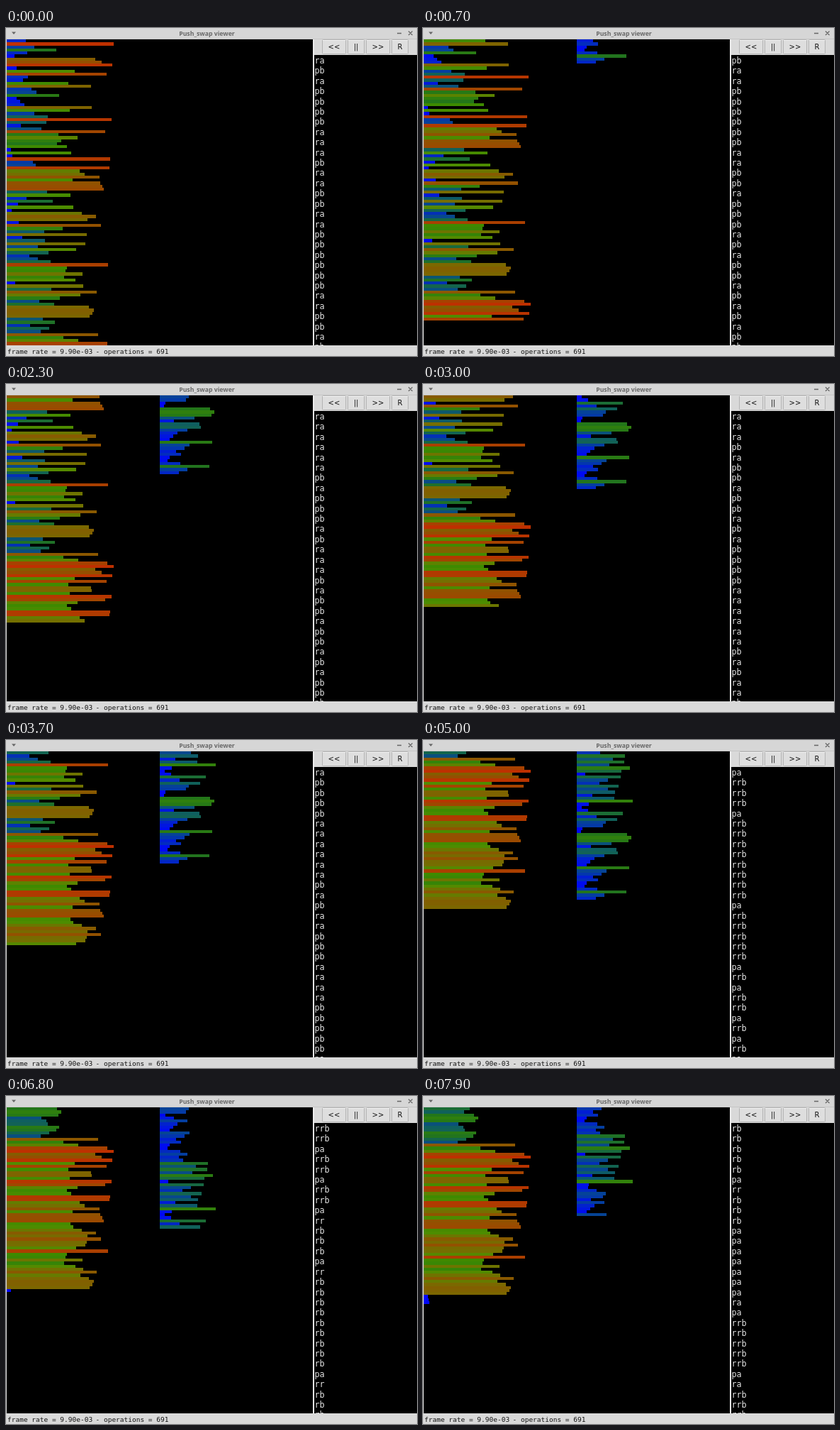
These frames come from a looping animation (580 by 462 pixels, 8000 ms). An HTML page with a canvas:

```html
<!DOCTYPE html>
<html lang="en">
<head>
<meta charset="utf-8">
<title>Push_swap viewer</title>
<style>
  html, body { margin: 0; width: 100%; height: 100%; overflow: hidden; background: #d9d9d9; }
  #stage { position: relative; width: 580px; height: 462px; overflow: hidden; background: #d9d9d9; }
  #stage > * { position: absolute; }
  svg { left: 0; top: 0; }
  #bars { left: 1px; top: 16px; background: #000; }
  #ops {
    left: 435px; top: 38px; width: 145px; height: 409px; overflow: hidden;
    margin: 0; padding: 1px 0 0 0.5px; box-sizing: border-box;
    background: #000; color: #e6e6e6;
    font: 11.7px/14.4px "DejaVu Sans Mono", monospace;
  }
</style>
</head>
<body>
<div id="stage">
  <svg width="580" height="462">
    <rect width="580" height="15" fill="#d6d6d6"/>
    <path d="M0 15.5H580" stroke="#c6c6c6"/>
    <path d="M8 5.5h6l-3 3.5z" fill="#666"/>
    <path d="M552 7.5h6M568 4.500l5.500 5.500m0-5.500l-5.500 5.500" stroke="#666" stroke-width="1.3" fill="none"/>
    <text x="283.500" y="10.500" text-anchor="middle" fill="#686868"
      font-family="Noto Sans, sans-serif" font-weight="700" font-size="8.700">Push_swap viewer</text>
    <rect x="433" y="16" width="2" height="431" fill="#ececec"/>
    <g id="buttons" text-anchor="middle" font-family="DejaVu Sans, sans-serif" font-size="10"></g>
    <g font-family="DejaVu Sans Mono, monospace" font-size="9.500" fill="#111">
      <text x="2" y="458.500">frame rate = 9.90e-03</text>
      <text x="126.500" y="458.500">- operations = 691</text>
    </g>
  </svg>
  <canvas id="bars" width="432" height="431"></canvas>
  <pre id="ops"></pre>
</div>
<script>
const LOOP = 8000, STEP = 100;
const PITCH = 4.263, B_X = 216, LINES = 29, PIVOT = 80.5;

// Bar lengths in stack order, top first.
const start = [
  28, 152, 40, 71, 30, 12, 126, 135, 150, 15, 97, 142, 31, 24, 88, 120, 36, 43, 75, 15,
  20, 26, 121, 90, 40, 59, 149, 57, 21, 50, 140, 74, 101, 78, 72, 86, 7, 92, 9, 147,
  38, 42, 146, 104, 111, 132, 94, 133, 136, 138, 58, 91, 29, 66, 17, 95, 8, 107, 127, 115,
  18, 134, 80, 54, 114, 23, 55, 112, 45, 99, 60, 33, 45, 63, 144, 86, 84, 108, 82, 98,
  13, 109, 64, 128, 105, 76, 47, 68, 117, 124, 122, 118, 52, 69, 34, 61, 49, 130, 81, 102, 143
];

// First pass splits around the pivot; then moves written as name and repeat count.
const split = start.slice(0, 97).map(v => v < PIVOT ? "pb" : "ra");
const script = "pa2 rrb3 pa rrb8 pa rrb5 pa rrb pa rrb2 pa rrb pa rrb pa rrb pa " +
  "rrb pa ra rrb4 pa rrb2 pa rrb2 pa rr rb3 pa rr rb9 pa rr rb3 pa7 ra pa rrb5 pa ra rrb5";
const later = script.split(" ").flatMap(s => {
  const [, name, n] = s.match(/([a-z]+)(\d*)/);
  return Array(+n || 1).fill(name);
});
const ops = [...split, ...later];
const shown = ["ra", ...ops];

const moves = {
  pa: (a, b) => a.unshift(b.shift()),
  pb: (a, b) => b.unshift(a.shift()),
  ra: a => a.push(a.shift()),
  rb: (a, b) => b.push(b.shift()),
  rr: (a, b) => { moves.ra(a); moves.rb(a, b); },
  rrb: (a, b) => b.unshift(b.pop())
};

const states = [[start, []]];
for (const op of ops) {
  const [a, b] = states[states.length - 1].map(s => s.slice());
  moves[op](a, b);
  states.push([a, b]);
}

// [tick, operations done]
const pace = [[0, 0], [13, 26], [23, 45], [37, 70], [50, 99], [68, 135], [79, 154]];
const hues = [
  [0, 0, 0, 255], [15, 0, 12, 240], [40, 4, 62, 160], [57, 15, 95, 95], [72, 35, 118, 25],
  [86, 62, 138, 0], [97, 80, 140, 0], [110, 115, 112, 0], [124, 130, 95, 0],
  [136, 150, 78, 0], [153, 192, 46, 0]
];

// Linear lookup in a table whose first column is the key.
function lookup(table, x) {
  let i = 1;
  while (i < table.length - 1 && table[i][0] < x) i++;
  const p = table[i - 1], q = table[i];
  const t = (x - p[0]) / (q[0] - p[0]);
  return p.slice(1).map((v, k) => Math.round(v + (q[k + 1] - v) * t));
}

const ctx = document.getElementById("bars").getContext("2d");
const list = document.getElementById("ops");

function drawStack(stack, x) {
  stack.forEach((v, i) => {
    const y = Math.round(i * PITCH);
    ctx.fillStyle = `rgb(${lookup(hues, v)})`;
    ctx.fillRect(x, y, v - 1, Math.round((i + 1) * PITCH) - y);
  });
}

function draw(tick) {
  const [done] = lookup(pace, tick);
  const [a, b] = states[done];
  ctx.clearRect(0, 0, 432, 431);
  drawStack(a, 0);
  drawStack(b, B_X);
  list.textContent = shown.slice(done, done + LINES).join("\n");
}

const buttons = [["<<", 446, 34], ["||", 482, 24], [">>", 508, 34], ["R", 544, 24]];
document.getElementById("buttons").innerHTML = buttons.map(([label, x, w]) => `
  <rect x="${x + 0.5}" y="16.5" width="${w - 1}" height="20" rx="1" fill="#dedede" stroke="#b4b4b4"/>
  <path d="M${x + 1} 17.5h${w - 2}" stroke="#f2f2f2"/>
  <text x="${x + w / 2}" y="30" fill="#111">${label.replace(/</g, "&lt;")}</text>`).join("");

let last = -1;
function loop() {
  const tick = Math.floor(performance.now() % LOOP / STEP);
  if (tick !== last) draw(last = tick);
  requestAnimationFrame(loop);
}
loop();
</script>
</body>
</html>
```
